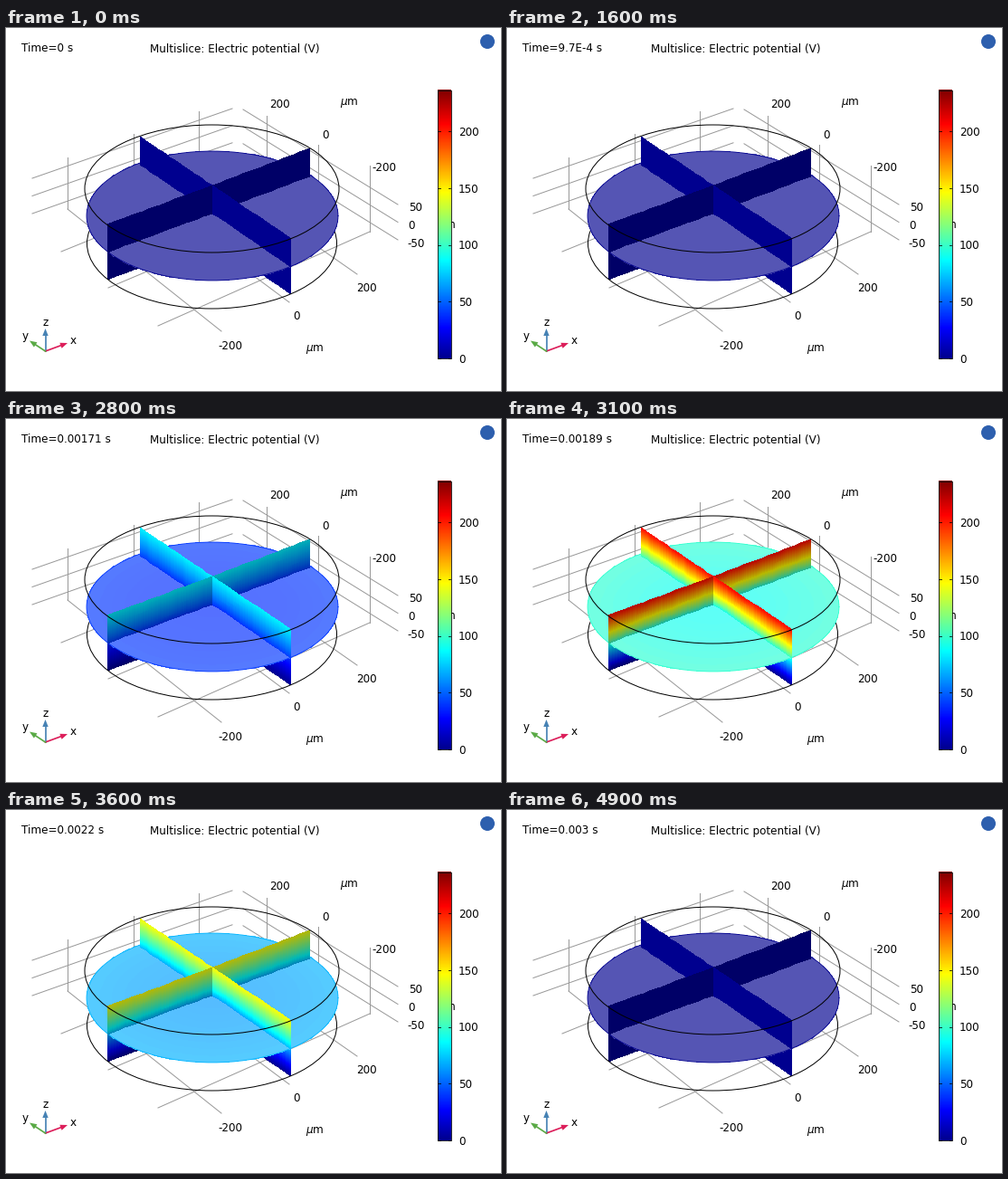
A matplotlib script that plays this animation: 547x401 px, repeating every 5000 ms.

```python
import numpy as np
import matplotlib.pyplot as plt
from matplotlib.animation import FuncAnimation
from matplotlib.colors import ListedColormap
from matplotlib.patches import Circle, Ellipse, Polygon, Rectangle

W, H, DPI = 547, 401, 64
FRAMES, INTERVAL = 50, 100
PT = 72 / DPI
V_MAX = 237
plt.rcParams["font.family"] = "DejaVu Sans"
plt.rcParams["mathtext.fontset"] = "dejavusans"

fig = plt.figure(figsize=(W / DPI, H / DPI), dpi=DPI, facecolor="white")
ax = fig.add_axes([0, 0, 1, 1])
ax.set_xlim(0, W)
ax.set_ylim(H, 0)
ax.axis("off")


def rainbow(gain=1.0, lift=0.0):
    x = np.linspace(0.015, 1, 512)[:, None]
    rgb = np.clip(1.5 - np.abs(4 * x - np.array([3, 2, 1])), 0, 1)
    return ListedColormap(rgb * gain + lift)


def line(p, q, color="#999999", width=1.0, z=1):
    ax.plot([p[0], q[0]], [p[1], q[1]], color=color, lw=width * PT, zorder=z)


def label(x, y, s, ha="center", z=20):
    return ax.text(x, y, s, ha=ha, va="center_baseline", size=12 * PT,
                   color="black", zorder=z)


def mesh(x, y, cmap, z):
    cells = np.zeros((x.shape[0] - 1, x.shape[1] - 1))
    return ax.pcolormesh(x, y, cells, cmap=cmap, vmin=0, vmax=V_MAX, zorder=z)


def mid_level(r):
    return 0.44 + 0.04 * r ** 2


def centres(a):
    return (a[1:] + a[:-1]) / 2


# Axis grid: back walls, then floor
for dz in (0, 19.5, 39):
    line((29, 166 + dz), (250, 89 + dz * 0.97))
    line((262, 90 + dz * 0.97), (433, 195 + dz))
for x, top, foot in ((68, 143, 200), (141, 117, 175), (213, 92, 150),
                     (288, 97, 155), (345, 129, 189), (402, 152, 225)):
    line((x, top), (x, foot))
for p, q in (((168, 329), (402, 225)), ((113, 287), (345, 189)),
             ((61, 247), (288, 155)), ((238, 335), (68, 200)),
             ((313, 303), (141, 175)), ((388, 272), (213, 150))):
    line(p, q)

# Vertical slices: each runs from the axis to the rim
AXIS_X, AXIS_TOP, HALF = 228, 174, 30.5
DARK, BRIGHT = rainbow(0.72), rainbow(1.0)
RIMS = ((148, 120, BRIGHT, 6), (336, 133, DARK, 6),
        (112, 217, DARK, 7), (315, 233, BRIGHT, 8))
fields = []
r = np.linspace(0, 1, 13)
s = np.linspace(0, 1, 32)
rc, sc = np.meshgrid(centres(r), centres(s))
for rim_x, rim_top, cmap, z in RIMS:
    px = np.tile(AXIS_X + (rim_x - AXIS_X) * r, (len(s), 1))
    top = AXIS_TOP + (rim_top - AXIS_TOP) * r
    upper = top + HALF * (1 - s[:, None])
    mid = mid_level(rc)
    fields.append((mesh(px, upper, cmap, z), mid + (1 - mid) * sc ** 0.85))
    if rim_top > AXIS_TOP:
        fields.append((mesh(px, upper + HALF, cmap, 3), mid * sc))

# Horizontal slice
theta = np.linspace(0, 2 * np.pi, 181)
ring = np.linspace(0, 1, 11)[:, None]
disc_x = 228 + 139 * ring * np.cos(theta)
disc_y = 204.5 + 3 * ring + 71.5 * ring * np.sin(theta)
disc_level = np.tile(mid_level(centres(ring)), (1, len(theta) - 1))
fields.append((mesh(disc_x, disc_y, rainbow(0.667, 0.333), 5), disc_level))
rim, = ax.plot(disc_x[-1], disc_y[-1], lw=0.8 * PT, zorder=5.5)

# Cylinder outline
for centre, w, h, z in (((227.5, 177.5), 281, 141, 12),
                        ((227.5, 238), 276, 144, 4)):
    ax.add_patch(Ellipse(centre, w, h, fill=False, ec="black",
                         lw=1 * PT, zorder=z))

for x, y, s_ in ((302, 83, "200"), (353, 117, "0"), (418, 153, "-200"),
                 (453, 197, "50"), (448, 217, "0"), (453, 237, "-50"),
                 (398, 286, "200"), (321, 317, "0"), (248, 350, "-200"),
                 (379.5, 80, r"$\mu$m"), (341.5, 352, r"$\mu$m")):
    label(x, y, s_)
label(487, 217, r"$\mu$m", z=14)

# Colour bar
ax.imshow(np.linspace(1, 0, 297)[:, None], cmap=BRIGHT, aspect="auto",
          extent=(476.5, 491.5, 365, 68), vmin=0, vmax=1, zorder=15)
ax.set_xlim(0, W)
ax.set_ylim(H, 0)
ax.add_patch(Rectangle((476.5, 68.5), 15, 296.5, fill=False, ec="black",
                       lw=0.8 * PT, zorder=16))
for volts in range(0, 201, 50):
    y = 365 - volts * 1.255
    label(500, y, str(volts), ha="left")
    for x in (477, 488.5):
        line((x, y), (x + 2.5, y), "black", 0.8, 17)


# Orientation triad
def arrow(tip, color):
    base = np.array([43.5, 357.0])
    d = np.array(tip) - base
    d /= np.hypot(*d)
    side = np.array([-d[1], d[0]]) * 3.2
    neck = np.array(tip) - 8 * d
    line(base, neck, color, 1.7, 18)
    ax.add_patch(Polygon([tip, neck + side, neck - side], color=color,
                         lw=0, zorder=19))


arrow((43.5, 332), "#4682b4")
arrow((68, 348), "#dc1e5a")
arrow((26, 345.5), "#5aaa46")
label(74.5, 344, "x")
label(21, 339, "y")
label(43.5, 324, "z")

ax.add_patch(Circle((532, 15), 8, color="#2d5fae", lw=0, zorder=20))
label(159, 21.5, "Multislice: Electric potential (V)", ha="left")
clock = label(17, 21, "", ha="left")


def time_text(k):
    """Format k steps of 10 microseconds as seconds."""
    if k == 0:
        value = "0"
    elif k < 10:
        value = f"{k}E-5"
    elif k < 100:
        value = f"{k / 10:g}E-4"
    else:
        value = f"{k / 1e5:g}"
    return f"Time={value} s"


def update(i):
    k = 300 * i // (FRAMES - 1)
    volts = V_MAX * np.exp(-((k - 200) / 20) ** 2 / 2)
    clock.set_text(time_text(k))
    for surface, level in fields:
        surface.set_array(level * volts)
    rim.set_color(BRIGHT(mid_level(1) * volts / V_MAX))
    return []


anim = FuncAnimation(fig, update, frames=FRAMES, interval=INTERVAL,
                     init_func=lambda: update(0), repeat=True,
                     repeat_delay=0, blit=False)
plt.show()
```
